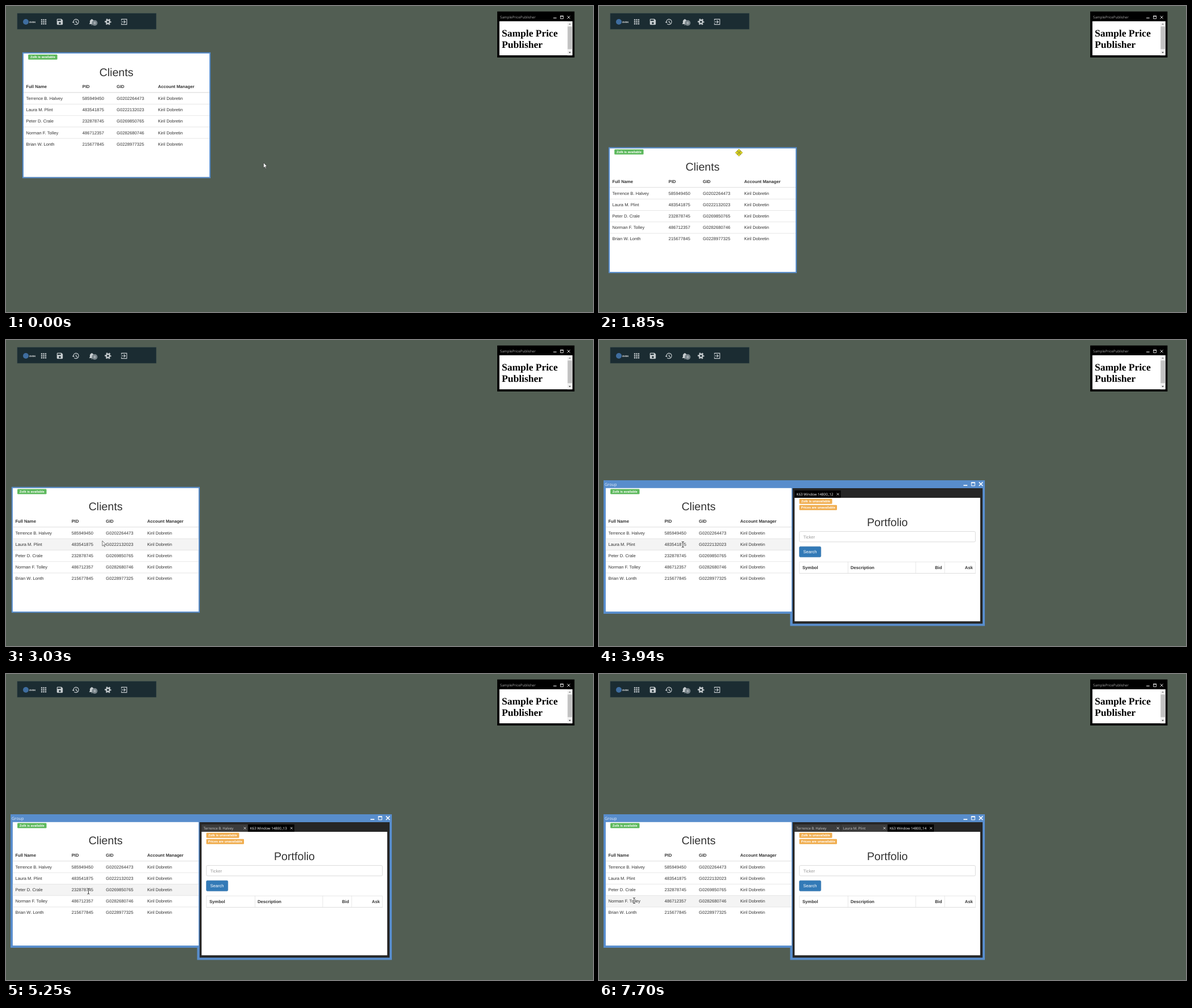
An HTML page for the animation above (8000 ms loop, 1036 by 541 pixels).

```html
<!DOCTYPE html>
<html lang="en">
<head>
<meta charset="utf-8">
<title>Client windows</title>
<style>
  html, body { margin: 0; width: 100%; height: 100%; overflow: hidden; background: #525e53; }
  svg { display: block; width: 100vw; height: 100vh; }
  text { font: 7.65px "Liberation Sans", Arial, sans-serif; fill: #333; text-rendering: geometricPrecision; white-space: pre; }
  .b { font-weight: 700; }
  .h1 { font-size: 19.67px; text-anchor: middle; }
  .tag { font-size: 5.74px; font-weight: 700; fill: #fff; text-anchor: middle; }
  .ui { font: 6.2px "Open Sans", "Noto Sans", sans-serif; }
  .serif { font: bold 17.5px "Liberation Serif", serif; fill: #000; }
  .end { text-anchor: end; }
  .mid { text-anchor: middle; }
</style>
</head>
<body>
<svg id="stage" viewBox="0 0 1036 541" preserveAspectRatio="none"></svg>
<script>
const LOOP = 8000;
const BLUE = '#588dcc';
const PEOPLE = [
  ['Terrence B. Halvey', '585949450', 'G0202264473'],
  ['Laura M. Plint', '483541875', 'G0222132023'],
  ['Peter D. Crale', '232878745', 'G0269850765'],
  ['Norman F. Tolley', '486712357', 'G0282680746'],
  ['Brian W. Lonth', '215677845', 'G0228977325']
];
const COLS = [35.5, 134.8, 195.3, 268.3];
const ROW = 20.2, ROW_TOP = 153.3;

// Bursts of movement: start, end, number of updates
const BURSTS = [
  [70, 680, 9], [820, 1150, 5], [1320, 1850, 8], [2020, 2780, 11], [2880, 2880, 1],
  [3030, 3390, 6], [3730, 3940, 4], [4090, 4880, 11], [4950, 5250, 5],
  [5430, 5520, 2], [5820, 6610, 11], [6690, 7290, 8], [7460, 7700, 4]
];
const DRAG = [
  [1240, 0, 0], [1320, 1, 18], [1400, 2, 62], [1470, 0, 98.2], [1620, -5, 132],
  [1850, -12, 167.8], [2020, -13, 170], [2250, -19.1, 177.8]
];
const POINTER = [
  [0, 454.5, 277], [250, 345, 150], [430, 224.5, 28.5], [680, 262, 96], [820, 262, 96],
  [1150, 259, 91.5], [2250, 240, 269.3], [2780, 177, 352], [2880, 173, 360],
  [3030, 170, 355], [3390, 159.5, 339.5], [3730, 157, 343], [3940, 148, 361.5],
  [4300, 139, 364], [4880, 144.5, 371], [5250, 145.5, 384], [5520, 145.5, 385],
  [5820, 140, 387], [6610, 80, 401], [7290, 58, 401], [7700, 62, 400.7]
];
// shown: tab opens; named: title turns into the client's name
const TABS = [
  { title: 'K63 Window 14800_12', name: PEOPLE[0][0], shown: 3730, named: 5020 },
  { title: 'K63 Window 14800_13', name: PEOPLE[1][0], shown: 4640, named: 5820 },
  { title: 'K63 Window 14800_14', name: PEOPLE[2][0], shown: 7460, named: LOOP }
];

const rect = (x, y, w, h, fill, more = '') =>
  `<rect x="${x}" y="${y}" width="${w}" height="${h}" fill="${fill}" ${more}/>`;
const text = (x, y, s, cls = '', more = '') => `<text x="${x}" y="${y}" class="${cls}" ${more}>${s}</text>`;
const line = (d, color, width = 1, more = '') =>
  `<path d="${d}" fill="none" stroke="${color}" stroke-width="${width}" ${more}/>`;
const tag = (x, y, w, s, color) =>
  rect(x, y, w, 9, color, 'rx="1.3"') + text(x + w / 2, y + 6.4, s, 'tag');
const cross = (x, y, r, color, width) =>
  line(`M${x - r} ${y - r}l${2 * r} ${2 * r}M${x + r} ${y - r}l${-2 * r} ${2 * r}`, color, width);

function toolbar() {
  const ink = '#c6cccf';
  const icon = (cx, body) => `<g transform="translate(${cx} 28) scale(.58)">${body}</g>`;
  let dots = '';
  for (let i = 0; i < 9; i++) dots += rect(-8 + i % 3 * 6, -8 + Math.floor(i / 3) * 6, 4, 4, ink);
  return rect(20, 13, 245, 28, '#1b2c32', 'stroke="#2a3d42" stroke-width=".6"') +
    '<circle cx="35" cy="28" r="5" fill="#3f6d9f"/>' +
    text(41, 29.6, 'OVEK', 'b', 'style="font-size:4px;fill:#fff"') +
    icon(66.5, dots) +
    icon(95, `<path d="M-7-9H5l4 4V7a2 2 0 0 1-2 2H-7a2 2 0 0 1-2-2V-7a2 2 0 0 1 2-2zM-7-7v4H3v-4zM3 4a3 3 0 1 0-6 0 3 3 0 1 0 6 0z" fill="${ink}" fill-rule="evenodd"/>`) +
    icon(123, line('M-7 0A8 8 0 1 1-4.7 5.7M1-4V1l4 2.4', ink, 2) +
      `<path d="M-11 0h8l-4 4z" fill="${ink}"/>`) +
    icon(151.5, `<path d="M-8 7V6l2-2v-5q0-5 4.500-6.300a1.500 1.500 0 0 1 3 0Q6-6 6-1v5l2 2v1zM-2 8h4a2 2 0 0 1-4 0z" fill="${ink}"/>`) +
    '<circle cx="156.5" cy="30" r="5" fill="#78848a"/>' +
    text(156.5, 32, '0', 'mid', 'style="font-size:5.6px;fill:#fff"') +
    icon(180, `<circle r="5.2" fill="none" stroke="${ink}" stroke-width="4"/>` +
      `<circle r="8.4" fill="none" stroke="${ink}" stroke-width="3" pathLength="12" stroke-dasharray="1" stroke-dashoffset=".5"/>`) +
    icon(208.5, line('M-8-4V-8H8V8H-8V4', ink, 2) + line('M-9 0H3M-1-4.500L3.500 0L-1 4.500', ink, 2));
}

function publisher() {
  return rect(867, 9.7, 136.3, 81.3, '#000') +
    text(872, 22.3, 'SamplePricePublisher', 'ui', 'style="fill:#a8a8a8"') +
    line('M966 21.200h5.600', '#ddd', 1.2) +
    line('M978.500 17.800h5v4.700h-5z', '#ddd', .9) + line('M978 17.800h6', '#ddd', 1.4) +
    cross(993, 20, 2.5, '#ddd', 1) +
    rect(870.8, 27, 128.7, 60.2, '#fff') +
    text(875, 54, 'Sample Price', 'serif') + text(875, 74.2, 'Publisher', 'serif') +
    rect(990.7, 27, 8.8, 60.2, '#f1f1f1') + rect(991.3, 36.3, 7.6, 40, '#c1c1c1') +
    '<path d="M993 33l2-2.200 2 2.200z" fill="#888"/><path d="M993 81.300h4l-2 2.200z" fill="#444"/>';
}

function clients() {
  const heads = ['Full Name', 'PID', 'GID', 'Account Manager'];
  let s = rect(31, 84, 328, 218.3, '#fff') +
    rect(31, ROW_TOP, 328, ROW, '#f4f4f4', 'id="hover"') +
    tag(39.2, 85.7, 51.4, 'Zolk is available', '#5cb85c') +
    text(194.8, 123.5, 'Clients', 'h1') +
    line('M31 152.900h328', '#ddd', 1.1);
  heads.forEach((h, i) => s += text(COLS[i], 145.2, h, 'b'));
  PEOPLE.forEach((p, r) => {
    const y = ROW_TOP + r * ROW;
    if (r) s += line(`M31 ${y}h328`, '#ddd', .7);
    [...p, 'Kiril Dobretin'].forEach((v, i) => s += text(COLS[i], y + 12.6, v));
  });
  return s;
}

function groupFrame() {
  return rect(8, 248, 673, 236, BLUE) + rect(337.3, 262, 343.7, 243.5, BLUE) +
    text(10, 258.2, 'Group', 'ui', 'style="font-size:7.3px;fill:#e8eff8"') +
    line('M643.300 257h6.800', '#fff', 1.7) +
    line('M657.300 252h6v5.800h-6z', '#fff', 1) + line('M656.800 252.300h7', '#fff', 1.8) +
    cross(674, 254.7, 3.3, '#fff', 1.5) +
    rect(341.7, 262, 335.3, 239.5, '#262626') + rect(345.2, 279, 327.6, 218.3, '#fff');
}

function portfolio() {
  return tag(353.5, 280.7, 58, 'Zolk is unavailable', '#f0ad4e') +
    tag(353.5, 291.7, 66.5, 'Prices are unavailable', '#f0ad4e') +
    text(509, 329.2, 'Portfolio', 'h1') +
    rect(353.7, 338.5, 310.6, 18.4, '#fff', 'stroke="#ccc" stroke-width=".7" rx="2"') +
    text(360.5, 350.5, 'Ticker', '', 'style="fill:#999"') +
    rect(353.5, 365.2, 38.2, 18.6, '#337ab7', 'stroke="#2e6da4" stroke-width=".5" rx="2"') +
    text(372.5, 377.2, 'Search', 'mid', 'style="fill:#fff"') +
    line('M353.700 412.500V392.300H664.300V412.500M439.500 392v20.500M559 392v20.500M610 392v20.500', '#ddd', .7) +
    line('M353.400 412.500H664.700', '#ddd', 1.2) +
    text(359, 405, 'Symbol', 'b') + text(444, 405, 'Description', 'b') +
    text(605.3, 405, 'Bid', 'b end') + text(659.7, 405, 'Ask', 'b end');
}

function tabStrip(t) {
  const open = TABS.filter(tab => t >= tab.shown);
  return open.map((tab, i) => {
    const x = 345.2 + i * 82.2, active = i === open.length - 1;
    return rect(x, 266, 81.4, 13, active ? '#000' : '#3c3c3c') +
      text(x + 3.4, 275, t >= tab.named ? tab.name : tab.title, 'ui', `style="fill:${active ? '#fff' : '#ccc'}"`) +
      cross(x + 76.4, 272.6, 1.9, '#eee', .9);
  }).join('');
}

function cursors() {
  let heads = '';
  for (let a = 0; a < 360; a += 90)
    heads += `<path transform="rotate(${a})" d="M0-6.300L3-3.200H1V0H-1V-3.200H-3z"/>`;
  const beam = 'M-2-5Q0-5 0-4Q0-5 2-5M0-4.500V4.500M-2 5Q0 5 0 4Q0 5 2 5';
  return '<path id="arrow" d="M0 0V9.200L2.200 7.200 3.700 10.500 5 9.900 3.600 6.700H6.400z" fill="#fff" stroke="#222" stroke-width=".6"/>' +
    '<g id="move"><path d="M0-6.500L6.500 0L0 6.500L-6.500 0z" fill="#d8d020" opacity=".75"/>' +
    `<g fill="#f0e820" stroke="#77751a" stroke-width=".6">${heads}</g></g>` +
    `<g id="beam">${line(beam, '#fff', 2)}${line(beam, '#222', .9)}</g>`;
}

const $ = id => document.getElementById(id);
$('stage').innerHTML = rect(0, 0, 1036, 541, '#525e53') + toolbar() + publisher() +
  `<g id="group">${groupFrame()}<g id="tabs"></g><g id="portfolio">${portfolio()}</g></g>` +
  `<g id="clients">${rect(30, 83, 330, 220.3, 'none', `id="edge" stroke="${BLUE}" stroke-width="2.2"`)}${clients()}</g>` +
  cursors();

function track(keys, t) {
  const i = keys.findIndex(k => k[0] > t);
  if (i === 0) return keys[0].slice(1);
  if (i < 0) return keys[keys.length - 1].slice(1);
  const [a, b] = [keys[i - 1], keys[i]], f = (t - a[0]) / (b[0] - a[0]);
  return [1, 2].map(n => a[n] + (b[n] - a[n]) * f);
}

// Snap time to the last screen update
function snap(t) {
  let s = 0;
  for (const [from, to, n] of BURSTS) {
    if (t < from) break;
    const step = (to - from) / Math.max(1, n - 1);
    s = step ? Math.min(to, from + Math.floor((t - from) / step + .1) * step) : from;
  }
  return s;
}

const show = (id, on) => $(id).setAttribute('display', on ? 'inline' : 'none');
const place = (id, x, y) => $(id).setAttribute('transform', `translate(${x} ${y})`);
let strip = '';

function draw(t) {
  const s = snap(t), [dx, dy] = track(DRAG, s);
  const dragging = s > 1150 && s < 2250;
  const [x, y] = dragging ? [259 + dx, 91.5 + dy] : track(POINTER, s);
  const kind = s >= 3730 ? 'beam' : s >= 980 && s < 2250 ? 'move' : 'arrow';
  for (const id of ['arrow', 'move', 'beam']) show(id, id === kind);
  place(kind, x, y);
  place('clients', dx, dy);

  const row = Math.floor((y - dy - ROW_TOP) / ROW);
  show('hover', s >= 2250 && row >= 0 && row < PEOPLE.length);
  $('hover').setAttribute('y', ROW_TOP + row * ROW);

  show('group', t >= 3730);
  show('edge', t < 3730);
  show('portfolio', t >= 3800);
  const next = tabStrip(t);
  if (next !== strip) $('tabs').innerHTML = strip = next;
}

const begin = performance.now();
function tick() {
  draw((performance.now() - begin) % LOOP);
  requestAnimationFrame(tick);
}
tick();
</script>
</body>
</html>
```
